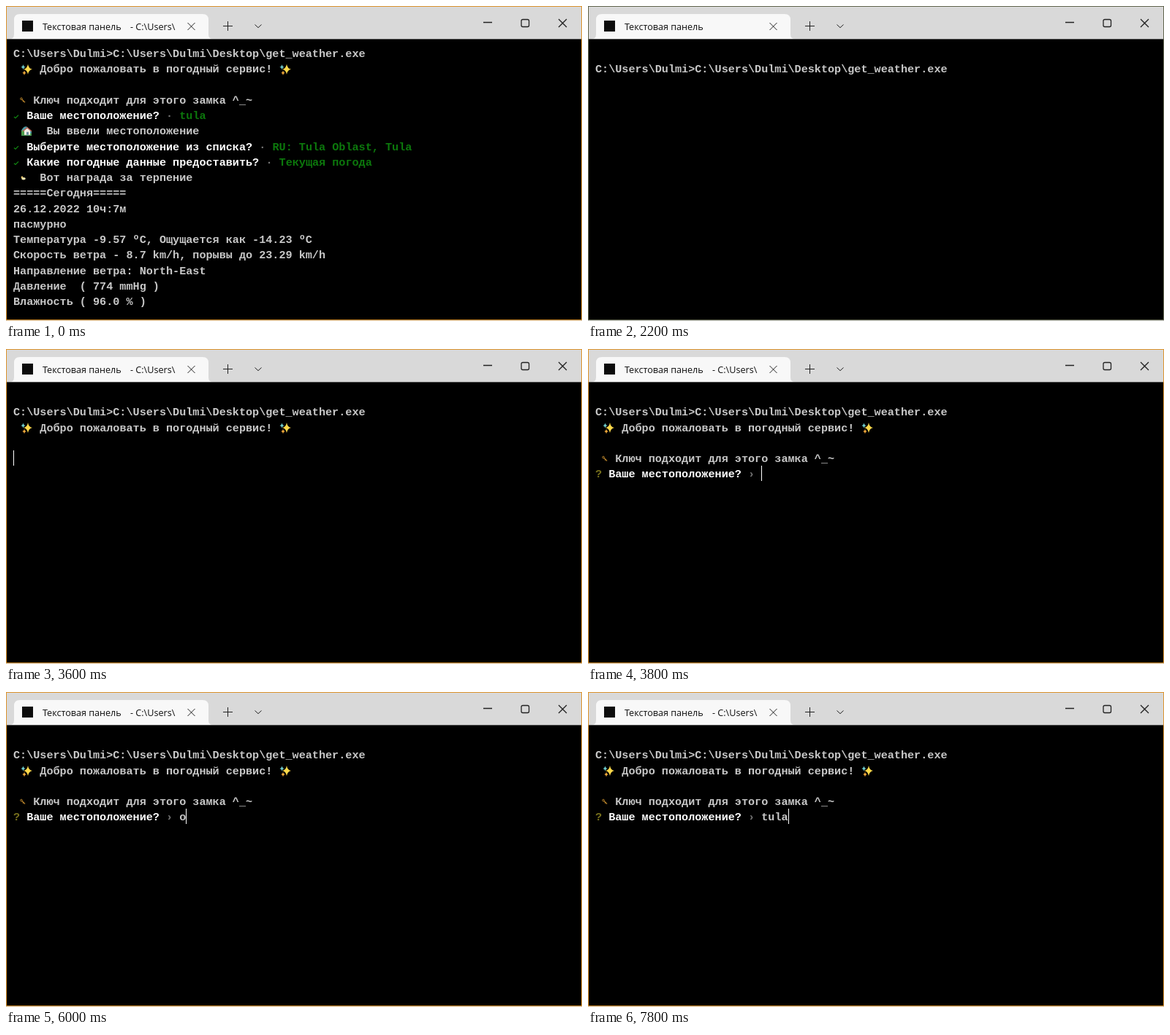
An HTML page that plays this animation: 788 px wide and 432 px high, repeating every 8000 ms.

```html
<!DOCTYPE html>
<html lang="ru">
<head>
<meta charset="utf-8">
<title>Погодный сервис</title>
<style>
  html, body { margin: 0; width: 100%; height: 100%; overflow: hidden; background: #000; }
  svg { display: block; width: 788px; height: 432px; }
  text { white-space: pre; }
  .term text { font: 700 15.15px "Liberation Mono", "DejaVu Sans Mono", monospace; fill: #c8c8c8; }
  .term .bold { fill: #fff; }
  .term .green { fill: #0c780c; }
  .term .grey { fill: #767676; }
  .term .olive { fill: #77701c; }
  .title { font: 500 12.6px "Open Sans", "Noto Sans", sans-serif; fill: #111; }
  .line { fill: none; stroke: #222; }
</style>
</head>
<body>
<svg viewBox="0 0 788 432">
  <defs>
    <path id="star" d="M0-7Q1-1 6 0Q1 1 0 7Q-1 1-6 0Q-1-1 0-7Z"/>
    <g id="sparkles">
      <use href="#star" x="2" fill="#fbd94a"/>
      <use href="#star" transform="translate(-4.5 -3) scale(.55)" fill="#6cc7c8"/>
      <use href="#star" transform="translate(-3 5) scale(.45)" fill="#f2a93b"/>
    </g>
    <g id="key" fill="none" stroke="#b9842b">
      <circle cx="-2" cy="-2" r="1.3"/>
      <path d="M-1-1L3 3M1 1L0 2" stroke-width="1.2"/>
    </g>
    <g id="house">
      <path d="M-7 6V-1Q-3-8 1-6L7 0V6Z" fill="#4d9aa5"/>
      <path d="M-7 6V0Q-5-3-3 0V3H7V6Z" fill="#4a9a48"/>
      <path d="M-3 5V-1L1-4L5-1V5Z" fill="#f0ece2"/>
      <path d="M-5 0L1-5L7 0" fill="none" stroke="#c8604e" stroke-width="1.3"/>
      <path d="M0 5V1H3V5Z" fill="#6b8da0"/>
    </g>
    <g id="gift">
      <ellipse cx="1" cy="1.2" rx="2.8" ry="1.8" fill="#f3e7b4"/>
      <circle cx="-1" cy="-.6" r="1.4" fill="#e6c770"/>
    </g>
    <path id="check" d="M-3 1.5L-1 3.2L3-.8" fill="none" stroke="#128a12" stroke-width="1.2"/>
    <clipPath id="titleClip"><rect x="50" y="12" width="182.5" height="32"/></clipPath>
  </defs>
  <rect width="788" height="432"/>
  <rect width="788" height="45.4" fill="#d9d9d9"/>
  <rect id="hover" x="634" y="2" width="52" height="43" fill="#ccd6ca"/>
  <path d="M5 45Q11 45 11 39V19Q11 11 19 11H269Q277 11 277 19V39Q277 45 283 45Z" fill="#f8f8f8"/>
  <rect x="22" y="20" width="15" height="15" fill="#0c0c0c"/>
  <g class="title" clip-path="url(#titleClip)">
    <text x="50" y="33">Текстовая панель</text>
    <text id="path" x="170" y="33">- C:\Users\</text>
  </g>
  <path class="line" d="M248.5 23l10 10m0-10l-10 10M297 27.5h13M303.5 21v13M340.5 25.5l4.5 4.2l4.5-4.2"/>
  <g class="line" stroke-width="1.3">
    <path d="M653 22.5h12M756 18l11 11m0-11l-11 11"/>
    <rect x="705" y="18.5" width="10.5" height="10" rx="2"/>
  </g>
  <g class="term" id="screen"></g>
  <rect id="cursor" width="1" height="21" fill="#fff"/>
  <rect y="431" width="788" height="1" fill="#d0d0d0"/>
  <rect id="border" x=".5" y=".5" width="787" height="430" fill="none"/>
</svg>
<script>
const LOOP = 8000, COL = 9.09, ROW = 21.25;
const el = id => document.getElementById(id);

const text = (col, row, str, cls = "") =>
  `<text class="${cls}" x="${10 + COL * col}" y="${70 + ROW * row}">${str.replace(/>/g, "&gt;")}</text>`;
const icon = (name, x, row) => `<use href="#${name}" x="${x}" y="${65.5 + ROW * row}"/>`;

const prompt = String.raw`C:\Users\Dulmi>`;
const command = prompt + String.raw`C:\Users\Dulmi\Desktop\get_weather.exe`;

const welcome = row => icon("sparkles", 28, row) +
  text(4, row, "Добро пожаловать в погодный сервис!") + icon("sparkles", 382, row);
const keyLine = row => icon("key", 23, row) + text(3, row, "Ключ подходит для этого замка ^_~");
const answered = (row, question, answer) => icon("check", 14, row) +
  text(2, row, question, "bold") +
  text(question.length + 3, row, "·", "grey") +
  text(question.length + 5, row, answer, "green");

const report = [
  "=====Сегодня=====", "26.12.2022 10ч:7м", "пасмурно",
  "Температура -9.57 ºC, Ощущается как -14.23 ºC",
  "Скорость ветра - 8.7 km/h, порывы до 23.29 km/h",
  "Направление ветра: North-East", "Давление  ( 774 mmHg )", "Влажность ( 96.0 % )"
];
const finished = text(0, 0, command) + welcome(1) + keyLine(3) +
  answered(4, "Ваше местоположение?", "tula") +
  icon("house", 28, 5) + text(5, 5, "Вы ввели местоположение") +
  answered(6, "Выберите местоположение из списка?", "RU: Tula Oblast, Tula") +
  answered(7, "Какие погодные данные предоставить?", "Текущая погода") +
  icon("gift", 23, 8) + text(4, 8, "Вот награда за терпение") +
  report.map((str, i) => text(0, 9 + i, str)).join("");

const started = text(0, 1, command) + welcome(2);
const asking = typed => started + keyLine(4) + text(0, 5, "?", "olive") +
  text(2, 5, "Ваше местоположение?", "bold") + text(23, 5, "›", "grey") + text(25, 5, typed);

// Each list holds [start time, value]; the latest started entry applies.
const screens = [
  [0, finished], [1000, text(0, 1, prompt)], [2000, text(0, 1, command)], [3600, started],
  [3800, asking("")], [6000, asking("o")], [6600, asking("")],
  [7200, asking("t")], [7400, asking("tu")], [7600, asking("tul")], [7800, asking("tula")]
];
const cursors = [
  [0, null], [2800, [53, 1]], [3200, null], [3400, [53, 1]], [3600, [0, 4]],
  [3800, [25, 5]], [4000, null], [4600, [25, 5]], [5200, null], [5600, [25, 5]],
  [6000, [26, 5]], [6400, null], [6600, [25, 5]],
  [7200, [26, 5]], [7400, [27, 5]], [7600, [28, 5]], [7800, [29, 5]]
];
const at = (list, t) => list.findLast(([start]) => start <= t)[1];
const show = (id, on) => el(id).setAttribute("visibility", on ? "visible" : "hidden");

let shown;
function draw(t) {
  const screen = at(screens, t);
  if (screen !== shown) el("screen").innerHTML = shown = screen;

  const cursor = at(cursors, t);
  show("cursor", cursor);
  if (cursor) {
    el("cursor").setAttribute("x", Math.round(9.97 + COL * cursor[0]));
    el("cursor").setAttribute("y", Math.round(54 + ROW * cursor[1]));
  }
  show("path", t < 1000 || t >= 3600);
  show("hover", t >= 4600 && t < 4800);
  el("border").setAttribute("stroke", t < 1000 || t >= 2800 ? "#dd952f" : "#62664f");
}

function tick() {
  draw(performance.now() % LOOP);
  requestAnimationFrame(tick);
}
tick();
</script>
</body>
</html>
```
